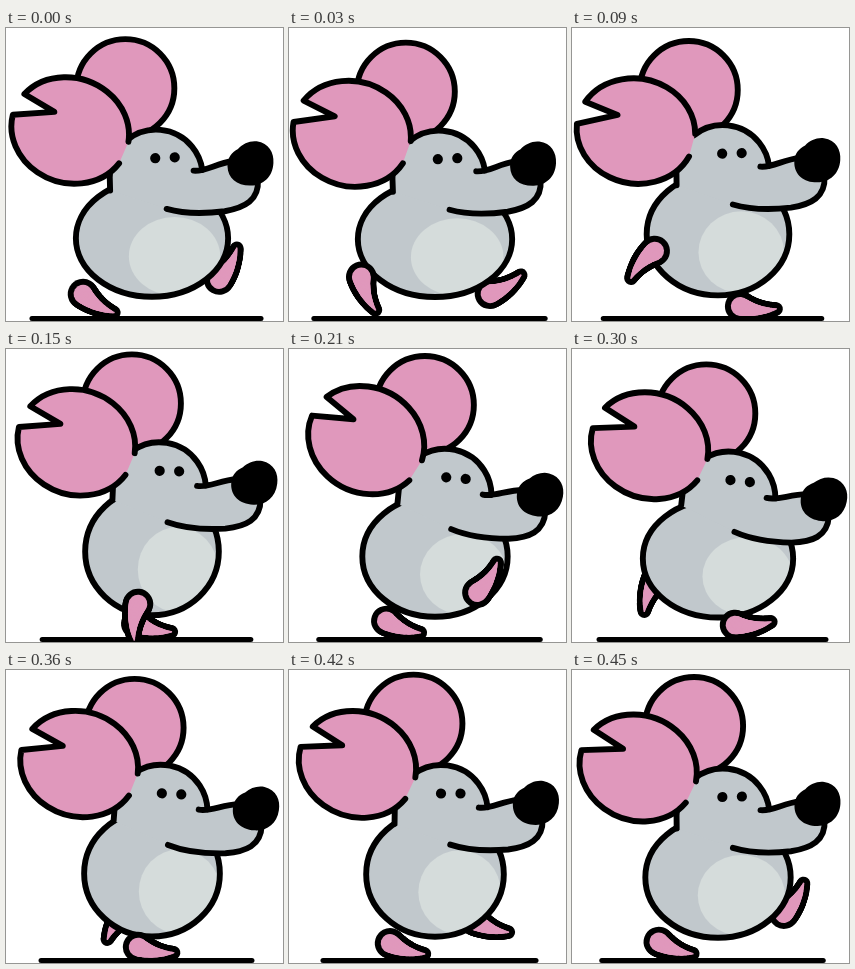
An HTML page with a canvas that plays this animation: 277x293 px, repeating every 0.48 s.

```html
<!DOCTYPE html>
<html lang="en">
<head>
<meta charset="utf-8">
<title>Running mouse</title>
<style>
  html, body { margin: 0; width: 100%; height: 100%; overflow: hidden; background: #fff; }
  canvas { display: block; }
</style>
</head>
<body>
<canvas id="stage" width="277" height="293"></canvas>
<script>
const ctx = document.getElementById('stage').getContext('2d');
const LOOP = 480, STEP = 30, LINE = 5.9;
const PINK = '#e098bc', GREY = '#c1c8cc', LIGHT = '#d5dcdb', BLACK = '#000';
const RAD = Math.PI / 180;

// Cosine that peaks at the given time.
const wave = (t, peak, period) => Math.cos((t - peak) / period * 2 * Math.PI);

// The head sways once per loop; the body bobs once per footfall.
function poseAt(t) {
  const sway = wave(t, 272, LOOP);
  const bob = wave(t, 25, LOOP / 2);
  const lateBob = wave(t, 52, LOOP / 2);
  const flick = wave(t, 215, LOOP / 2);
  return {
    squeeze: 5 - 5.2 * bob,
    bellyX: 172 + 3.8 * sway,
    eyeX: 153.8 + 5 * sway,
    eyeY: 127 + 5.2 * bob + sway,
    tilt: 2.5 + 4.5 * sway,
    backEarX: 126.5 + 10 * sway + 2.5 * flick,
    backEarY: 59 + 5.5 * lateBob,
    earX: 70.7 + 8 * sway + flick,
    earY: 97 - 5 * sway + 4.5 * lateBob,
    earTilt: 19.3 + 5 * sway + 5.2 * flick
  };
}

// Key points of one stride: heel position and direction of the toe in degrees.
const STRIDE = [
  { t: 0, x: 77, y: 266, angle: 31 },
  { t: 80, x: 78, y: 222, angle: 128 },
  { t: 150, x: 132, y: 255, angle: 96 },
  { t: 215, x: 190, y: 244, angle: -62 },
  { t: 300, x: 163, y: 276, angle: -5 },
  { t: 400, x: 111, y: 274, angle: 15 }
];

// Smooth periodic curve through the stride's key points.
function strideAt(t, key) {
  const n = STRIDE.length;
  const at = i => STRIDE[(i + n) % n].t + Math.floor(i / n) * LOOP;
  const val = i => STRIDE[(i + n) % n][key];
  const slope = i => (val(i + 1) - val(i - 1)) / (at(i + 1) - at(i - 1));
  let i = n - 1;
  while (at(i) > t) i--;
  const d = at(i + 1) - at(i), u = (t - at(i)) / d, v = 1 - u;
  return v * v * (1 + 2 * u) * val(i) + u * u * (3 - 2 * u) * val(i + 1)
    + d * u * v * (v * slope(i) - u * slope(i + 1));
}

function paint(fill, stroke) {
  if (fill) { ctx.fillStyle = fill; ctx.fill(); }
  if (stroke) { ctx.strokeStyle = BLACK; ctx.lineWidth = stroke; ctx.stroke(); }
}

function ellipse(x, y, rx, ry, fill, stroke) {
  ctx.beginPath();
  ctx.ellipse(x, y, rx, ry, 0, 0, 7);
  paint(fill, stroke);
}

// Runs the drawing in coordinates moved to (x, y) and turned by degrees.
function placed(x, y, degrees, drawing) {
  ctx.save();
  ctx.translate(x, y);
  ctx.rotate(degrees * RAD);
  drawing();
  ctx.restore();
}

// A bent, tapering row of discs; the far foot is half a loop behind.
function drawFoot(t, far) {
  const phase = far ? (t + LOOP / 2) % LOOP : t;
  const shift = far ? 17 - 7 * wave(phase, 0, LOOP) : 0;
  const [x, y, angle] = ['x', 'y', 'angle'].map(key => strideAt(phase, key));
  placed(x + shift, y, angle, () => {
    for (const [color, grow] of [[BLACK, LINE / 2], [PINK, -LINE / 2]]) {
      for (let u = 0; u <= 1; u += 1 / 32) {
        const r = 12.3 - 8.5 * u + grow;
        ellipse(36 * u, 10 * u * (1 - u), r, r, color);
      }
    }
  });
}

function drawGround(squeeze) {
  const half = 115.5 - squeeze * 1.1;
  ctx.beginPath();
  ctx.moveTo(140.5 - half, 290.5);
  ctx.lineTo(140.5 + half, 290.5);
  paint(null, 5);
}

function drawBody(p) {
  const rx = 77 - p.squeeze;
  const ry = 58 + p.squeeze * 0.55;
  const y = 269 - p.squeeze * 0.28 - ry;
  ellipse(146, y, rx, ry, GREY);
  ctx.save();
  ctx.clip();
  ellipse(p.bellyX, y + 18, rx * 0.6, ry * 0.67, LIGHT);
  ctx.restore();
  ellipse(146, y, rx, ry, null, LINE);
}

// Head coordinates are relative to the left eye.
function drawHead() {
  const dome = (from, to) => ctx.arc(0.5, 18, 46.5, from * RAD, to * RAD);
  const snout = () => ctx.bezierCurveTo(50, 15, 60, 7, 78, 5);
  const jaw = () => {
    ctx.bezierCurveTo(103, 45, 88, 52, 68, 55);
    ctx.bezierCurveTo(48, 57, 26, 56, 10, 51);
  };

  ctx.beginPath();
  ctx.moveTo(-46, 31);
  dome(180, 355);
  ctx.lineTo(38, 13.5);
  snout();
  ctx.lineTo(102, 24);
  jaw();
  paint(GREY);

  ctx.beginPath();
  ctx.moveTo(-46, 31);
  dome(180, 199);
  ctx.moveTo(0.5 + 46.5 * Math.cos(232 * RAD), 18 + 46.5 * Math.sin(232 * RAD));
  dome(232, 354);
  ctx.moveTo(38, 13.5);
  snout();
  ctx.moveTo(102, 24);
  jaw();
  paint(null, LINE);

  ellipse(0, 0, 5.1, 5.1, BLACK);
  ellipse(19.5, -0.3, 5.1, 5.1, BLACK);

  ctx.beginPath();
  ctx.moveTo(72, 10);
  ctx.bezierCurveTo(72, 1, 77, -4, 83, -7);
  ctx.bezierCurveTo(88, -12, 95, -15, 102, -14);
  ctx.bezierCurveTo(114, -12, 119, -2, 118, 8);
  ctx.bezierCurveTo(117, 22, 107, 30, 95, 30);
  ctx.bezierCurveTo(81, 30, 72, 22, 72, 10);
  paint(BLACK);
}

function drawEar() {
  const arc = (from, to) => ctx.ellipse(0, 0, 59.5, 52.5, 0, from * RAD, to * RAD);
  ctx.beginPath();
  arc(17, 176);
  ctx.lineTo(-21, -12.5);
  arc(202, 351);
  paint(PINK, LINE);
}

function draw(t) {
  const p = poseAt(t);
  ctx.fillStyle = '#fff';
  ctx.fillRect(0, 0, 277, 293);
  ctx.lineCap = ctx.lineJoin = 'round';
  drawGround(p.squeeze);
  drawFoot(t, true);
  ellipse(p.backEarX, p.backEarY, 49, 49, PINK, LINE);
  drawBody(p);
  placed(p.eyeX, p.eyeY, p.tilt, drawHead);
  placed(p.earX, p.earY, p.earTilt, drawEar);
  drawFoot(t, false);
}

const start = performance.now();
function tick() {
  const elapsed = (performance.now() - start) % LOOP;
  draw(Math.floor(elapsed / STEP) * STEP);
  requestAnimationFrame(tick);
}
tick();
</script>
</body>
</html>
```
